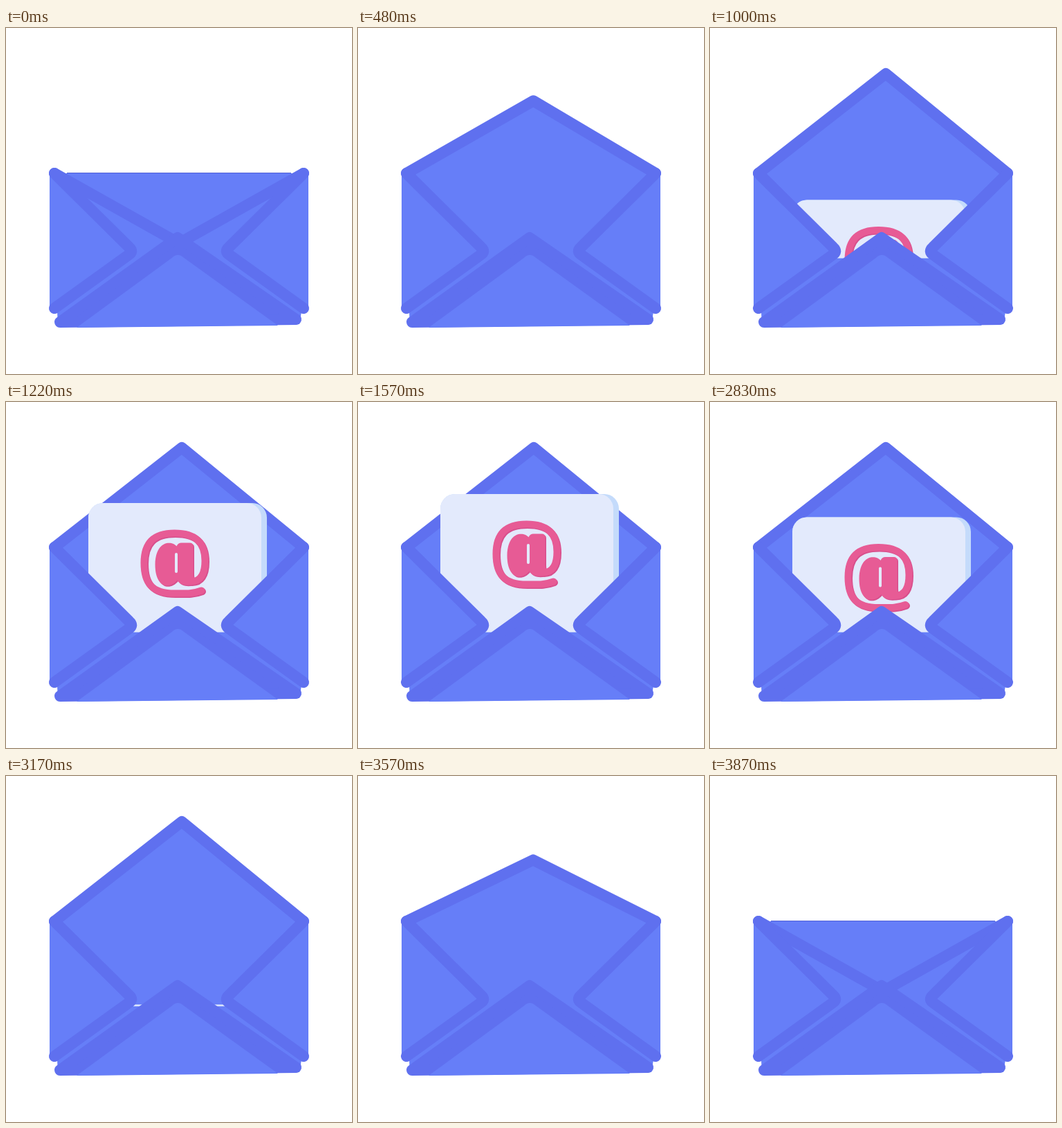
Write an HTML page that moves like this. It is 500 px wide and 500 px high and loops after 4080 ms.

```html
<!DOCTYPE html>
<html lang="en">
<head>
<meta charset="utf-8">
<title>Envelope</title>
<style>
  html, body { margin: 0; width: 100%; height: 100%; overflow: hidden; background: #fff; }
  svg { display: block; width: 100vw; height: 100vh; }
  .paper { fill: #667ef8; }
  .edge { fill: none; stroke: #5f70ef; stroke-width: 16; stroke-linecap: round; stroke-linejoin: round; }
</style>
</head>
<body>
<svg viewBox="0 0 500 500">
  <defs>
    <clipPath id="pocket"><path d="M0 0H500V332.5H0z"/></clipPath>
    <g id="side">
      <path class="paper" d="M63 210H70L184 323L70 405H63z"/>
      <path class="edge" d="M70 210L178 317Q185 323 177 328L70 405"/>
    </g>
    <g id="at" stroke-linecap="round">
      <path d="M283 260C270 265 258 264 244 264C211 264 200 249 200 220C200 191 213 177 244 177C275 177 288 191 288 217C288 237 281 247 268 247"
        fill="none" stroke="currentColor" stroke-width="10"/>
      <path d="M247 196C241 188 217 186 216 222C216 256 236 259 248 245C253 254 268 254 277 248C272 245 271 241 271 234V196Q271 191 266 191H254Q249 191 247 196z"
        fill="currentColor"/>
    </g>
  </defs>

  <path class="paper" d="M63 210H437V405L427 410L424 428L75 431L74 410L63 405z"/>
  <path id="flap" class="paper edge" style="fill:#667ef8"/>
  <path id="fold" d="M88 209.5H412" stroke="#4f5fd8"/>

  <g clip-path="url(#pocket)">
    <g id="letter">
      <rect x="119" y="133" width="258" height="300" rx="21" fill="#c4dbfb"/>
      <rect x="119" y="133" width="250" height="300" rx="21" fill="#e3eafc"/>
      <use href="#at" x="1" y="1" color="#d84f8c"/>
      <use href="#at" x="-.5" y="-.5" color="#e75b95"/>
      <path d="M246 207V232" stroke="#e3eafc" stroke-width="4" stroke-linecap="round"/>
    </g>
  </g>

  <use href="#side"/>
  <use href="#side" transform="matrix(-1 0 0 1 500 0)"/>
  <path class="edge" style="fill:#5f70ef" d="M78 425L248 303L419 421z"/>
  <path class="paper" d="M102 433L240 332Q248 324 257 332L393 430z"/>
</svg>
<script>
const flap = document.getElementById("flap");
const fold = document.getElementById("fold");
const letter = document.getElementById("letter");
const LOOP = 4080, STEPS_PER_MS = 0.023, LAST = 92;

// Height of the letter's top edge by step: rise, overshoot, settle
const rise = [[0, 719.5], [19, 330.5], [28, 146], [29, 130], [30, 123.5], [31, 123.5], [33, 128], [36, 133]];

const clamp = v => Math.min(1, Math.max(0, v));
const mix = (a, b, p) => a + (b - a) * p;

function along(points, x) {
  const i = points.findIndex(p => p[0] > x);
  if (i < 0) return points[points.length - 1][1];
  const [x0, y0] = points[i - 1], [x1, y1] = points[i];
  return mix(y0, y1, (x - x0) / (x1 - x0));
}

// cubic-bezier(.25, .1, .25, 1), solved by bisection
function ease(x) {
  const curve = (a, b, s) => 3 * a * s * (1 - s) ** 2 + 3 * b * s * s * (1 - s) + s ** 3;
  let lo = 0, hi = 1;
  for (let i = 0; i < 24; i++) {
    const mid = (lo + hi) / 2;
    if (curve(.25, .25, mid) < x) lo = mid; else hi = mid;
  }
  return curve(.1, 1, lo);
}

function draw(now) {
  const step = Math.floor((now % LOOP) * STEPS_PER_MS + 0.12);
  const pose = Math.max(0, Math.min(step, LAST - step)); // closing mirrors opening
  const open = pose <= 3 ? 0 : ease(clamp((pose - 3) / 14.8));
  const tip = mix(311, 66, open);
  flap.setAttribute("d", `M70 210L${mix(250, 254, open)} ${tip}L430 210`);
  fold.style.display = tip > 210 ? "" : "none";
  letter.setAttribute("transform", `translate(0 ${along(rise, pose) - 133})`);
}

function tick() {
  draw(performance.now());
  requestAnimationFrame(tick);
}
tick();
</script>
</body>
</html>
```
